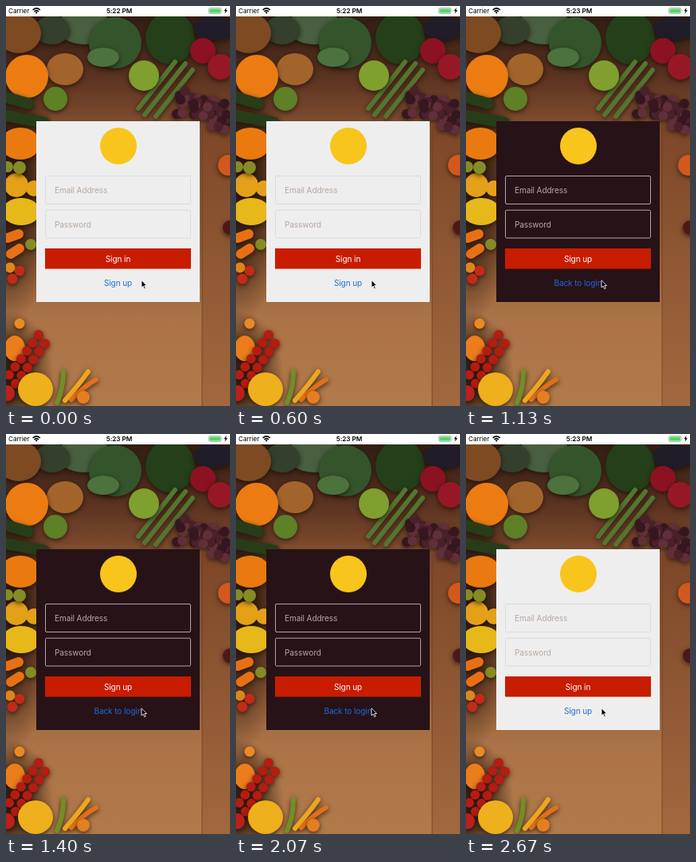
Animation, 281 px wide and 500 px high, one loop 2740 ms. Source, as an HTML page:

```html
<!DOCTYPE html>
<html lang="en">
<head>
<meta charset="utf-8">
<title>Sign in and sign up</title>
<style>
  html, body { margin: 0; width: 100%; height: 100%; overflow: hidden; background: #8a5838; }
  svg { display: block; width: 281px; height: 500px; }
  text { font: 10px Inter, "Open Sans", sans-serif; letter-spacing: -.07px; }
  .mid { text-anchor: middle; }
  .status text { font-size: 8.2px; }
  .status .clock { font-weight: 600; }
  .field { fill: none; stroke-width: .8; }
  .round { fill: none; stroke-linecap: round; }
  .produce > * { filter: drop-shadow(0 2px 3px rgba(24, 13, 7, .75)); }

  .anim { animation: 2740ms linear infinite both; }
  .dark { animation-name: dark; }
  .early { animation-name: early; animation-timing-function: step-end; }
  .late { animation-name: late; animation-timing-function: step-end; }
  .btn-in { animation-name: btn-in; }
  .btn-up { animation-name: btn-up; }
  .link-up { animation-name: link-up; }
  .link-back { animation-name: link-back; }

  @keyframes dark {
    0%, 27% { opacity: 0; }
    30.3%, 77.7% { opacity: 1; }
    81%, 100% { opacity: 0; }
  }
  @keyframes early { 0% { opacity: 1; } 36.5%, 100% { opacity: 0; } }
  @keyframes late { 0% { opacity: 0; } 36.5%, 100% { opacity: 1; } }
  @keyframes btn-in {
    0%, 32.8% { opacity: 1; fill: #fff; }
    36.5% { opacity: 0; fill: #fff; }
    81.4% { opacity: 0; fill: #8a1606; }
    82.9% { opacity: .55; fill: #8a1606; }
    87.6%, 100% { opacity: 1; fill: #fff; }
  }
  @keyframes btn-up {
    0%, 36.5% { opacity: 0; }
    40.1%, 77.7% { opacity: 1; }
    81.4%, 100% { opacity: 0; }
  }
  @keyframes link-up {
    0%, 28% { opacity: 1; fill: #1a73d6; }
    31.5% { opacity: 1; fill: #41363a; }
    33.6% { opacity: 0; fill: #41363a; }
    83.6% { opacity: 0; fill: #1a73d6; }
    87.6%, 100% { opacity: 1; fill: #1a73d6; }
  }
  @keyframes link-back {
    0%, 36.5% { opacity: 0; }
    40.1%, 77.7% { opacity: 1; }
    81%, 100% { opacity: 0; }
  }
</style>
</head>
<body>
<svg viewBox="0 0 281 500">
  <defs>
    <linearGradient id="wood" x2="0" y2="1">
      <stop offset="0" stop-color="#2b1a12"/>
      <stop offset=".18" stop-color="#5c3321"/>
      <stop offset=".28" stop-color="#7c4a2d"/>
      <stop offset=".6" stop-color="#935b36"/>
      <stop offset=".78" stop-color="#ab7347"/>
      <stop offset="1" stop-color="#b17a4b"/>
    </linearGradient>
    <linearGradient id="plank" x2="0" y2="1">
      <stop offset="0" stop-color="#7d4728"/>
      <stop offset="1" stop-color="#a2693f"/>
    </linearGradient>
    <radialGradient id="shade">
      <stop offset=".3" stop-color="#22130b" stop-opacity=".85"/>
      <stop offset="1" stop-color="#22130b" stop-opacity="0"/>
    </radialGradient>
  </defs>

  <!-- table -->
  <rect width="281" height="500" fill="url(#wood)"/>
  <rect x="246" y="150" width="35" height="350" fill="url(#plank)"/>
  <path d="M246 150V500" stroke="#60371f" opacity=".7"/>
  <ellipse cx="0" cy="220" rx="66" ry="180" fill="url(#shade)"/>
  <ellipse cx="0" cy="460" rx="60" ry="80" fill="url(#shade)"/>

  <g class="produce">
    <!-- along the top -->
    <ellipse cx="98" cy="26" rx="34" ry="22" fill="#48603f"/>
    <ellipse cx="58" cy="30" rx="22" ry="18" fill="#343f2c"/>
    <ellipse cx="16" cy="34" rx="28" ry="25" fill="#7d4a22"/>
    <ellipse cx="74" cy="79" rx="23" ry="20" fill="#a3642c"/>
    <ellipse cx="137" cy="46" rx="33" ry="32" fill="#34552c"/>
    <ellipse cx="122" cy="64" rx="20" ry="12" fill="#4c723e"/>
    <ellipse cx="206" cy="40" rx="31" ry="33" fill="#243f19"/>
    <g class="round" stroke="#54752f" stroke-width="6">
      <path d="M225 72L174 136M234 80L188 138M212 70L166 128"/>
    </g>
    <ellipse cx="261" cy="28" rx="26" ry="15" fill="#211d28"/>
    <circle cx="247" cy="56" r="16" fill="#8c1222"/>
    <circle cx="269" cy="76" r="16" fill="#961826"/>
    <g id="grapes"></g>
    <circle cx="26" cy="88" r="27" fill="#ec7c12"/>
    <circle cx="173" cy="87" r="19" fill="#7f9f2e"/>
    <g class="round" stroke="#283c1a" stroke-width="14">
      <path d="M0 114L28 122M0 137L48 146"/>
    </g>
    <circle cx="62" cy="116" r="15" fill="#5e8026"/>

    <!-- right edge -->
    <circle cx="279" cy="199" r="13" fill="#d2581e"/>
    <circle cx="281" cy="277" r="9" fill="#4e1718"/>

    <!-- left edge -->
    <ellipse cx="18" cy="172" rx="25" ry="20" fill="#ea7a10"/>
    <g fill="#e4a019">
      <circle cx="13" cy="224" r="15"/>
      <circle cx="35" cy="228" r="10"/>
      <ellipse cx="19" cy="257" rx="24" ry="17" fill="#e6b81a"/>
    </g>
    <g fill="#858c26">
      <circle cx="17" cy="202" r="8"/>
      <circle cx="2" cy="201" r="7"/>
      <circle cx="31" cy="298" r="7"/>
    </g>
    <g class="round" stroke="#e87014" stroke-width="12">
      <path d="M2 290L16 285M6 310L17 303"/>
    </g>
    <g fill="#c02c18">
      <circle cx="17" cy="331" r="6.5"/>
      <circle cx="8" cy="341" r="6.5"/>
      <circle cx="5" cy="327" r="6.5" fill="#dc861c"/>
    </g>

    <!-- bottom corner -->
    <circle cx="17" cy="397" r="6.5" fill="#ea8a22"/>
    <ellipse cx="11" cy="428" rx="13" ry="16" fill="#ec7d1c"/>
    <g id="tomatoes" fill="#b51c12"></g>
    <ellipse cx="37" cy="479" rx="22" ry="21" fill="#eeb01c"/>
    <ellipse cx="2" cy="484" rx="9" ry="10" fill="#bc2018"/>
    <g class="round" stroke-width="6">
      <path d="M72 457Q72 478 64 496" stroke="#718f26"/>
      <path d="M103 457Q91 474 74 493" stroke="#eca71e"/>
      <path d="M113 467Q97 476 82 492" stroke="#e2701a"/>
    </g>
    <circle cx="97" cy="489" r="8" fill="#e57e20"/>
  </g>

  <!-- status bar -->
  <g class="status">
    <rect width="281" height="13" fill="#fff"/>
    <text x="3" y="9">Carrier</text>
    <g class="round" stroke="#000" stroke-width="1.5" style="stroke-linecap:butt">
      <path d="M33.6 5Q38.2 .8 42.8 5M35.4 7Q38.2 4.3 41 7"/>
    </g>
    <path d="M36.7 8Q38.2 6.6 39.7 8L38.2 9.8z"/>
    <text class="clock mid anim early" x="142" y="9">5:22 PM</text>
    <text class="clock mid anim late" x="142" y="9">5:23 PM</text>
    <rect x="254.4" y="2.4" width="15.6" height="7" rx="1.8" fill="none" stroke="#8d8d8d" stroke-width=".7"/>
    <rect x="255.4" y="3.4" width="13.6" height="5" rx="1" fill="#4cd964"/>
    <path d="M271 4.8q1 1.1 0 2.2z" fill="#8d8d8d"/>
    <path d="M276.6 2l-3.2 4.2h2l-1 3.6 3.6-4.6h-2z"/>
  </g>

  <!-- card -->
  <rect x="38" y="144" width="205" height="226" fill="#eee"/>
  <g class="field" stroke="#d8d8d8">
    <rect x="49.5" y="212.5" width="182" height="35" rx="1.5"/>
    <rect x="49.5" y="255.2" width="182" height="34.8" rx="1.5"/>
  </g>
  <g fill="#b9a7a2">
    <text x="61" y="234.2">Email Address</text>
    <text x="61" y="276.5">Password</text>
  </g>
  <g class="anim dark">
    <rect x="38" y="144" width="205" height="226" fill="#271217"/>
    <g class="field" stroke="#d2c9cb">
      <rect x="49.5" y="212.5" width="182" height="35" rx="1.5"/>
      <rect x="49.5" y="255.2" width="182" height="34.8" rx="1.5"/>
    </g>
    <g fill="#bda5a6">
      <text x="61" y="234.2">Email Address</text>
      <text x="61" y="276.5">Password</text>
    </g>
  </g>
  <circle cx="141" cy="175" r="23" fill="#f8c51c"/>
  <rect x="49" y="303" width="183" height="25.5" fill="#c81c00"/>
  <g class="mid" fill="#fff">
    <text class="anim btn-in" x="140.5" y="319.5">Sign in</text>
    <text class="anim btn-up" x="140.5" y="319.5">Sign up</text>
    <text class="anim link-up" x="140.5" y="349.7">Sign up</text>
    <text class="anim link-back" x="140.5" y="349.7" fill="#1a6bdc">Back to login</text>
  </g>
  <path d="M170 342.8v9.2l2.1-2 1.6 3.6 1.5-.7-1.5-3.4h2.9z" stroke="#fff" stroke-width=".8"/>
</svg>
<script>
  const dot = (id, x, y, r, fill) => {
    const c = document.createElementNS("http://www.w3.org/2000/svg", "circle");
    const attrs = { cx: x, cy: y, r };
    if (fill) attrs.fill = fill;
    for (const key in attrs) c.setAttribute(key, attrs[key]);
    document.getElementById(id).append(c);
  };

  let seed = 7;
  const rand = () => (seed = seed * 16807 % 2147483647) / 2147483647;

  const tones = ["#361620", "#4a202b", "#602f3a"];
  for (let i = 0; i < 44; i++) {
    const t = rand();
    dot("grapes", 214 + 66 * t, 100 + 22 * t + 38 * rand(), 6, tones[i % 3]);
  }

  // Two rows of cherry tomatoes along a slanted vine
  for (let i = 0; i < 6; i++) {
    dot("tomatoes", 41 - 7.4 * i, 411 + 10 * i, 6);
    dot("tomatoes", 49 - 7.4 * i, 422 + 10 * i, 6);
  }
</script>
</body>
</html>
```
